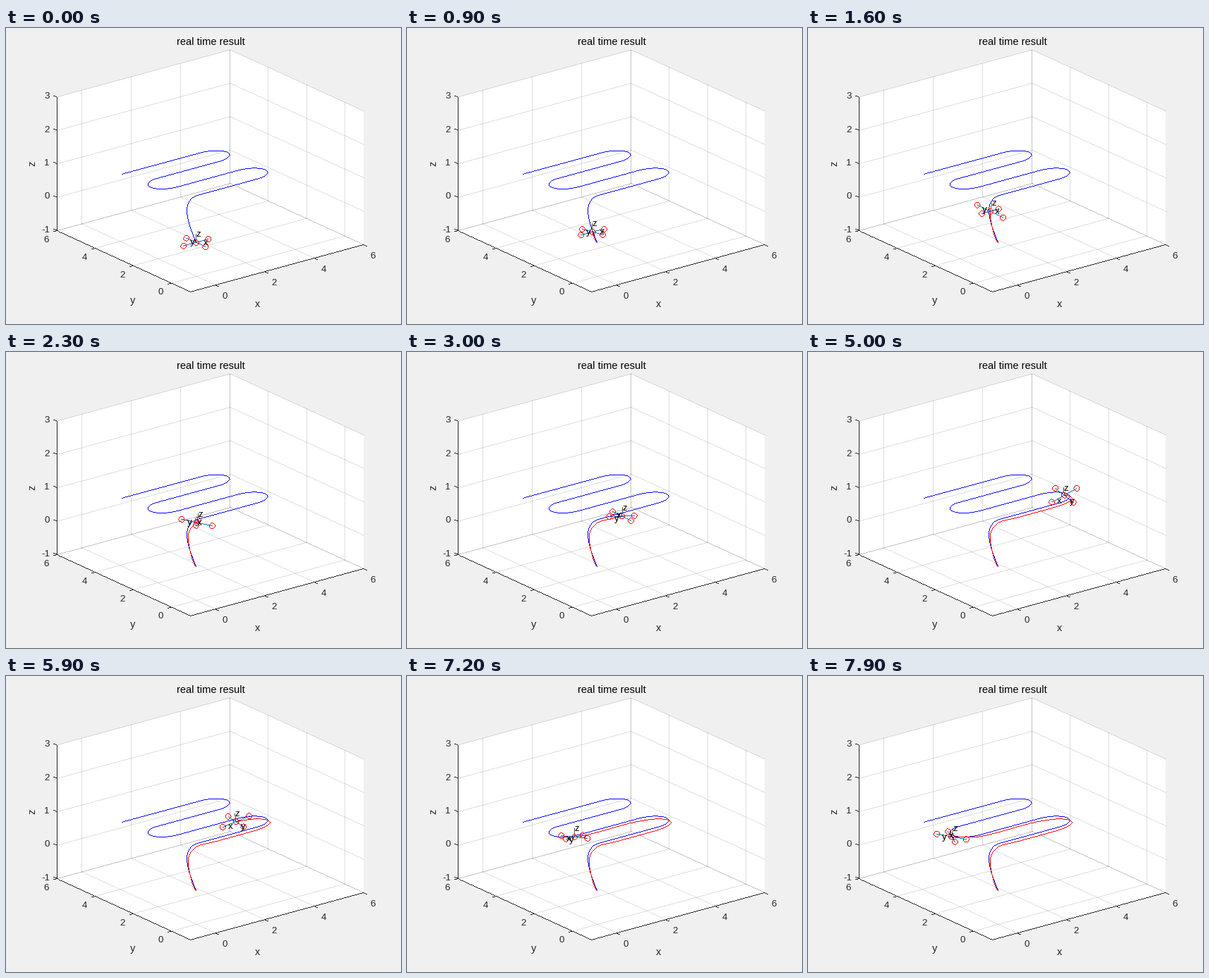
Animation, 560 px wide and 420 px high, one loop 8 s. Source, as a matplotlib script:

```python
import numpy as np
import matplotlib.pyplot as plt
from matplotlib.animation import FuncAnimation

W, H, DPI = 560, 420, 100
FRAMES, STEP = 80, 100
PX = 72 / DPI
INK = "#262626"

plt.rcParams["font.family"] = "Liberation Sans"
plt.rcParams["path.simplify"] = False
fig = plt.figure(figsize=(W / DPI, H / DPI), dpi=DPI, facecolor="#f0f0f0")
ax = fig.add_axes([0, 0, 1, 1])
ax.set_xlim(0, W)
ax.set_ylim(H, 0)
ax.axis("off")

# Screen vectors of one unit along each world axis
BASIS = np.array([[35.05, -9.55], [-27.05, -12.4], [0, -47.4]])
CORNER = np.array([261.8, 374.4])


def project(p):
    return CORNER + (np.asarray(p, float) + 1) @ BASIS


def trace(path):
    """Whole pixels along a path, without corner pixels."""
    path = np.asarray(path, float)
    s = np.append(0, np.cumsum(np.hypot(*np.diff(path, axis=0).T)))
    q = np.append(np.arange(0, s[-1], 0.3), s[-1])
    cells = np.floor(np.c_[np.interp(q, s, path[:, 0]),
                           np.interp(q, s, path[:, 1])]).astype(int)
    out = []
    for x, y in cells.tolist():
        if out and out[-1] == (x, y):
            continue
        if len(out) > 1 and abs(x - out[-2][0]) == 1 == abs(y - out[-2][1]):
            out.pop()
        out.append((x, y))
    return out


def crisp(*paths):
    """Coordinates of unit dashes that fill each pixel of the paths."""
    x, y = np.array([c for p in paths for c in trace(p)], float).T
    gap = np.full_like(x, np.nan)
    return np.c_[x, x + 1, gap].ravel(), np.c_[y + 0.5, y + 0.5, gap].ravel()


def line(color, *paths, **kw):
    xy = crisp(*paths) if paths else ([], [])
    return ax.plot(*xy, color=color, lw=PX, solid_capstyle="butt",
                   snap=False, **kw)[0]


def label(x, y, s, size=13.33, color=INK, ha="center", **kw):
    kw = {"va": "baseline", **kw}
    return ax.text(x, y, s, fontsize=size * PX, color=color, ha=ha, **kw)


# Box, grid and axes
LO, HI, TOP = -1, 6, 3
outline = [(LO, LO, LO), (HI, LO, LO), (HI, LO, TOP),
           (HI, HI, TOP), (LO, HI, TOP), (LO, HI, LO)]
ax.fill(*project(outline).T, color="white", lw=0)


def grid(*pts):
    line(INK, project(pts), alpha=0.15)


def tick(p, shift, text, dx, dy, ha="center"):
    a = project(p)
    line(INK, [a, a + shift])
    label(a[0] + dx, a[1] + dy, text, ha=ha)


for v in (0, 2, 4, 6):
    grid((v, LO, LO), (v, HI, LO))
    grid((v, HI, LO), (v, HI, TOP))
    grid((LO, v, LO), (HI, v, LO))
    grid((HI, v, LO), (HI, v, TOP))
    tick((v, LO, LO), (4.5, 2), str(v), 13, 19.5)
    tick((LO, v, LO), (-4.8, 1.3), str(v), -15.5, 16.5)
for v in range(LO, TOP + 1):
    grid((LO, HI, v), (HI, HI, v))
    grid((HI, LO, v), (HI, HI, v))
    tick((LO, HI, v), (-4.5, -2), str(v), -10.5, 2.3, "right")

line(INK, project([(LO, HI, TOP), (LO, HI, LO), (LO, LO, LO), (HI, LO, LO)]))

label(290, 24.4, "real time result", 14.67, "black")
label(356.5, 395.8, "x", 14.67)
label(180, 390.5, "y", 14.67)
label(37.5, 192, "z", 14.67, rotation=90, va="center")


# Planned path: climb, then a serpentine at z = 1
def bezier(*pts):
    a, b, c, d = map(np.array, pts)
    t = np.linspace(0, 1, 30)[:, None]
    return (a * (1 - t) ** 3 + 3 * b * t * (1 - t) ** 2
            + 3 * c * t ** 2 * (1 - t) + d * t ** 3)


def turn(cx, cy, side):
    a = np.linspace(-np.pi / 2, np.pi / 2, 50)
    return project(np.c_[cx + side * 0.7 * np.cos(a),
                         cy + 0.5 * np.sin(a), np.ones_like(a)])


plan = np.vstack([
    bezier((269.5, 304), (263, 288), (256.7, 272), (256.7, 259)),
    bezier((256.7, 259), (256.7, 247), (261, 240.5), (274, 236.9)),
    turn(3.25, 1.5, 1), turn(0.77, 2.5, -1), turn(3.25, 3.5, 1),
    project([(0.07, 4, 1)]),
])
line("blue", plan)


# Flown path: a smooth curve through a few timed points (s, x, y)
KEYS = np.array([
    (0, 269.4, 304.4), (0.9, 263, 289.5), (1.6, 258.3, 260.2),
    (2.2, 267.5, 244), (3, 304.5, 233), (4, 368.3, 213.8),
    (4.5, 374.3, 206.8), (5.2, 356.5, 202.8), (5.9, 326, 206.6),
    (7.2, 237.4, 228.5), (7.9, 203.5, 228),
])
KT, KP = KEYS[:, 0], KEYS[:, 1:]
KV = np.gradient(KP, KT, axis=0)
KV[0] = 0


def position(t):
    t = np.atleast_1d(t)
    i = np.clip(np.searchsorted(KT, t, "right") - 1, 0, len(KT) - 2)
    h = (KT[i + 1] - KT[i])[:, None]
    u = (t - KT[i])[:, None] / h
    return ((1 + 2 * u) * (1 - u) ** 2 * KP[i] + u * (1 - u) ** 2 * h * KV[i]
            + u * u * (3 - 2 * u) * KP[i + 1] + u * u * (u - 1) * h * KV[i + 1])


def body_axes(t):
    # Heading swings between 0 and 180 degrees
    phase = np.radians(41 * t - 38 * (1 - np.exp(-t / 1.3)))
    yaw = np.pi / 2 * (1 - np.cos(phase))
    # Lean along x on every lane, along y at each change of lane
    gx = 0.24 * min(1, t / 1.5) * np.sin(2 * np.pi * (t - 3.68) / 6)
    gy = -0.15 * np.sin(2 * np.pi * min(t % 3.3, 2.2) / 2.2)
    c, s = np.cos(yaw), np.sin(yaw)
    axes = np.array([(c, s, gx * c + gy * s),
                     (-s, c, gy * c - gx * s),
                     (-gx, -gy, 1)])
    axes /= np.linalg.norm(axes, axis=1, keepdims=True)
    return axes @ BASIS


RING = 4 * np.array([(np.cos(a), np.sin(a))
                     for a in np.linspace(0, 2 * np.pi, 33)])
TAGS = np.array([(0.3, 0, -0.05), (0, 0.3, -0.05), (0, 0, 0.25)])

trail = line("red", zorder=3)
arms = line((0, 0.447, 0.741), zorder=4)
mast = line("#505050", zorder=4)
rotors = line("red", zorder=5)
names = [label(0, 0, s, color="black", ha="left", zorder=6) for s in "xyz"]


def draw(n):
    t = n * STEP / 1000
    mid = position(t)[0]
    ex, ey, ez = axes = body_axes(t)
    tips = [mid + k * e / 2 for e in (ex, ey) for k in (-1, 1)]
    trail.set_data(*crisp(position(np.linspace(0, t, 4 * n + 1))))
    arms.set_data(*crisp(tips[:2], tips[2:]))
    mast.set_data(*crisp([mid, mid + ez / 4]))
    rotors.set_data(*crisp(*(p + RING for p in [mid, *tips])))
    for name, p in zip(names, mid + TAGS @ axes):
        name.set_position((p[0], p[1] + 3.8))
    return [trail, arms, mast, rotors, *names]


anim = FuncAnimation(fig, draw, frames=FRAMES, interval=STEP,
                     repeat=True, repeat_delay=0)
plt.show()
```
